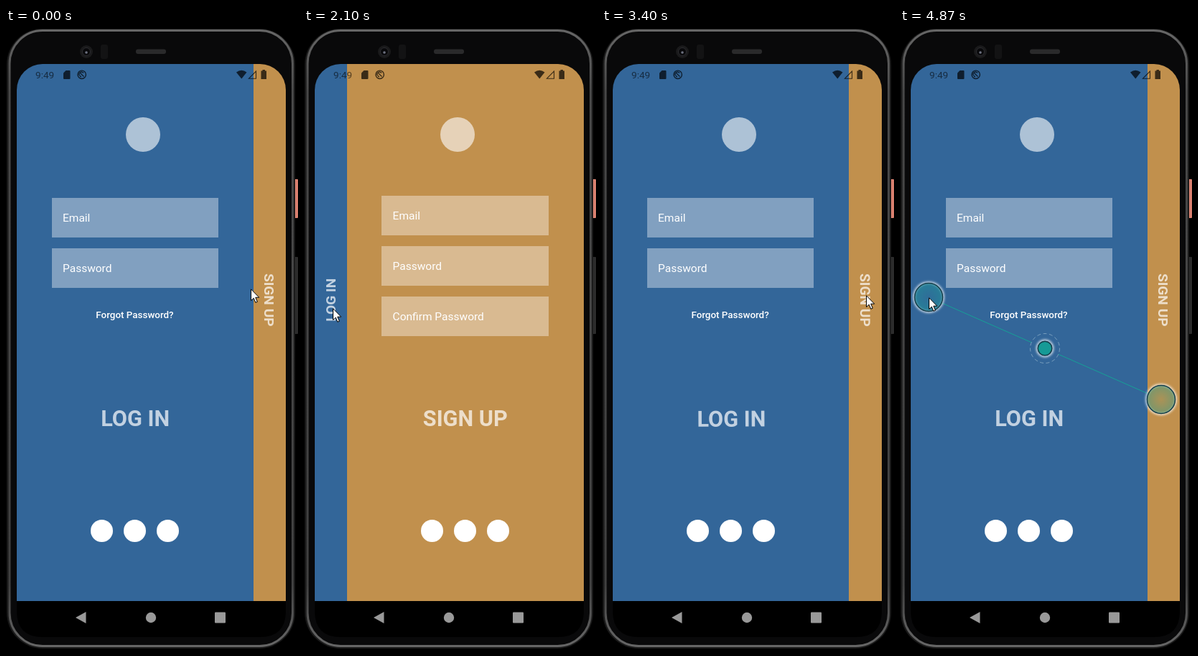
Animation, 407 px wide and 864 px high, one loop 5560 ms. Source, as an HTML page:

```html
<!DOCTYPE html>
<html lang="en">
<head>
<meta charset="utf-8">
<title>Login and sign up</title>
<style>
  html, body { margin: 0; width: 100%; height: 100%; overflow: hidden; background: #000; }
  body { position: relative; font-family: Roboto, "Open Sans", sans-serif; color: #fff; }
  svg, div { position: absolute; }
  svg { left: 0; top: 0; }
  #screen { left: 15px; top: 50px; width: 375px; height: 746px; overflow: hidden; border-radius: 36px 36px 0 0; }
  .panel { top: 0; width: 331px; height: 746px; }
  #login { background: #336699; }
  #signup { background: #c1904d; }
  .field { left: 48.5px; width: 217.3px; height: 55px; padding-left: 15.5px; background: rgba(255,255,255,.38); font-size: 15.5px; line-height: 56px; }
  #forgot { left: 0; width: 329px; top: 339px; line-height: 20px; text-align: center; font-size: 13.4px; font-weight: 500; }
  #logo { top: 74px; width: 48px; height: 48px; border-radius: 50%; background: rgba(255,255,255,.6); }
  .dot { top: 633px; width: 31px; height: 31px; border-radius: 50%; background: #fff; }
  .action { width: 154.4px; padding: 11.6px 0; line-height: 1.172; text-align: center; font-weight: 700; color: rgba(255,255,255,.7); }
  #loginText { transform-origin: 0 0; }
  #signupText { transform-origin: 100% 0; }
</style>
</head>
<body>
<svg width="407" height="864">
  <defs>
    <linearGradient id="rim" x2="0" y2="1">
      <stop offset="0" stop-color="#666"/><stop offset=".1" stop-color="#484848"/>
      <stop offset=".9" stop-color="#404040"/><stop offset="1" stop-color="#666"/>
    </linearGradient>
  </defs>
  <rect x="402" y="210" width="5" height="54" rx="1" fill="#d9806f"/>
  <rect x="402" y="318" width="5" height="107" rx="1" fill="#2b2b2b"/>
  <rect x="1" y="1" width="402" height="861" rx="50" fill="#1b1b1b"/>
  <rect x="5" y="3.5" width="394.5" height="855" rx="46" fill="#09090a" stroke="url(#rim)" stroke-width="3"/>
  <path d="M15 796H390V810Q390 846 354 846H51Q15 846 15 810Z"/>
  <circle cx="112" cy="33" r="9" fill="#1a1a1b"/>
  <circle cx="112" cy="33" r="5.5" fill="#08080a" stroke="#2c2c30"/>
  <circle cx="112" cy="34" r="1.8" fill="#6d7180"/>
  <rect x="132" y="23" width="10" height="20" rx="3" fill="#131314"/>
  <rect x="181" y="29.5" width="42" height="6.5" rx="3" fill="#2a2a2b"/>
  <g fill="#999">
    <path d="M97 819L111.5 811V827Z"/>
    <circle cx="202" cy="819" r="7.2"/>
    <rect x="291" y="811.5" width="15" height="15" rx="1"/>
  </g>
</svg>

<div id="screen">
  <div class="panel" id="login">
    <div class="field" style="top:186px">Email</div>
    <div class="field" style="top:256px">Password</div>
    <div id="forgot">Forgot Password?</div>
  </div>
  <div class="panel" id="signup">
    <div class="field" style="top:183.3px">Email</div>
    <div class="field" style="top:253.3px">Password</div>
    <div class="field" style="top:323.3px">Confirm Password</div>
  </div>
  <div id="logo"></div>
  <div class="dot"></div><div class="dot"></div><div class="dot"></div>
  <div class="action" id="loginText">LOG IN</div>
  <div class="action" id="signupText">SIGN UP</div>
</div>

<svg width="407" height="864">
  <defs>
    <radialGradient id="touch">
      <stop offset="0" stop-color="#16a096" stop-opacity=".12"/>
      <stop offset="1" stop-color="#16a096" stop-opacity=".42"/>
    </radialGradient>
    <filter id="glow" x="-50%" y="-50%" width="200%" height="200%"><feGaussianBlur stdDeviation="1.5"/></filter>
  </defs>
  <text x="41" y="70" font-size="13.6" fill="#000" fill-opacity=".56">9:49</text>
  <g fill="#000" fill-opacity=".7">
    <path d="M83.5 59H88.5Q89.5 59 89.5 60V70Q89.5 71 88.5 71H81Q80 71 80 70V62.5Z"/>
    <path d="M321 61.5Q328.3 56 335.5 61.5L328.3 70.5Z"/>
    <path d="M357.5 59.5V58H361V59.5H363V71H355.5V59.5Z"/>
  </g>
  <g fill="none" stroke="#000" stroke-opacity=".7" stroke-width="1.4">
    <circle cx="105.7" cy="64.8" r="5.7"/>
    <path d="M102.5 66A3.2 3.2 0 0 1 108 62.5M103.5 62.5L108.5 67.5M105 67.8A3 3 0 0 1 103 66"/>
    <path d="M338.5 70.2L348.5 60V70.2Z" stroke-width="1.1"/>
  </g>
  <g id="pinch">
    <path d="M58.5 382.1L183 436.7M221 453.3L345.5 507.9" stroke="#16a096" stroke-width="1"/>
    <g fill="none" stroke="#fff" stroke-opacity=".75" stroke-width="3" filter="url(#glow)">
      <circle cx="40" cy="374" r="20.5"/>
      <circle cx="364" cy="516" r="20.5"/>
      <circle cx="202" cy="445" r="11"/>
    </g>
    <g stroke="#123c48" stroke-width="1.5">
      <circle cx="40" cy="374" r="19.5" fill="url(#touch)"/>
      <circle cx="364" cy="516" r="19.5" fill="url(#touch)"/>
      <circle cx="202" cy="445" r="9.8" fill="#169a96"/>
    </g>
    <circle cx="202" cy="445" r="20.5" fill="none" stroke="#8fb0c8" stroke-opacity=".75" stroke-dasharray="5 3.5"/>
  </g>
  <path id="cursor" d="M.5 .8V16.5L4.2 13.2L6.8 19.3L9.3 18.2L6.7 12.2H11.7Z" fill="#fff" stroke="#000" stroke-width="1"/>
</svg>

<script>
const LOOP = 5560, SLIDE = 300, PINCH_AT = 4850;
const taps = [910, 2317, 3400, 4500];

// time, x, y of the pointer tip
const pointer = [
  [0, 341, 362], [30, 343, 364], [160, 358, 376], [300, 370, 387],
  [1610, 370, 387], [1700, 325, 396], [1800, 205, 405], [1900, 80, 401],
  [1980, 24, 392], [2020, 21, 390], [2100, 40, 389],
  [2470, 40, 389], [2530, 75, 393], [2600, 154, 396], [2700, 246, 392],
  [2790, 304, 386], [2870, 335, 381], [3000, 353, 376], [3170, 368, 371],
  [3480, 368, 371], [3570, 322, 377], [3700, 223, 380], [3830, 130, 377],
  [3930, 78, 374], [4050, 56, 374], [4270, 40, 374], [LOOP, 40, 374]
];

const $ = id => document.getElementById(id);
const mix = (a, b, p) => a + (b - a) * p;
const clamp = v => Math.max(0, Math.min(1, v));
const dots = document.querySelectorAll(".dot");

// 0 shows the login page, 1 the sign up page
function pageAt(t) {
  return taps.reduce((p, tap, i) => p + (i % 2 ? -1 : 1) * clamp((t - tap) / SLIDE), 0);
}

function pointerAt(t) {
  const i = pointer.findIndex(k => k[0] > t);
  const [t0, x0, y0] = pointer[i - 1], [t1, x1, y1] = pointer[i];
  const p = (t - t0) / (t1 - t0);
  return [mix(x0, x1, p), mix(y0, y1, p)];
}

// A label goes from the page (side = 0) to the turned edge tab (side = 1)
function placeLabel(id, edge, side, turn) {
  const s = $(id).style;
  s[edge] = mix(88, .4, side) + "px";
  s.bottom = mix(223, 295.8, side) + "px";
  s.fontSize = mix(30.7, 19.2, side) + "px";
  s.transform = `rotate(${turn * 90 * side}deg)`;
}

function draw() {
  const t = performance.now() % LOOP, p = pageAt(t);
  $("login").style.left = -285 * p + "px";
  $("signup").style.left = 329.6 - 285 * p + "px";
  $("logo").style.left = mix(152, 174.5, p) + "px";
  dots.forEach((d, i) => d.style.left = 103.2 + 45.9 * i + 45 * p + "px");
  placeLabel("loginText", "left", p, -1);
  placeLabel("signupText", "right", 1 - p, 1);
  $("pinch").style.display = t >= PINCH_AT ? "" : "none";
  $("cursor").setAttribute("transform", `translate(${pointerAt(t)})`);
  requestAnimationFrame(draw);
}
draw();
</script>
</body>
</html>
```
